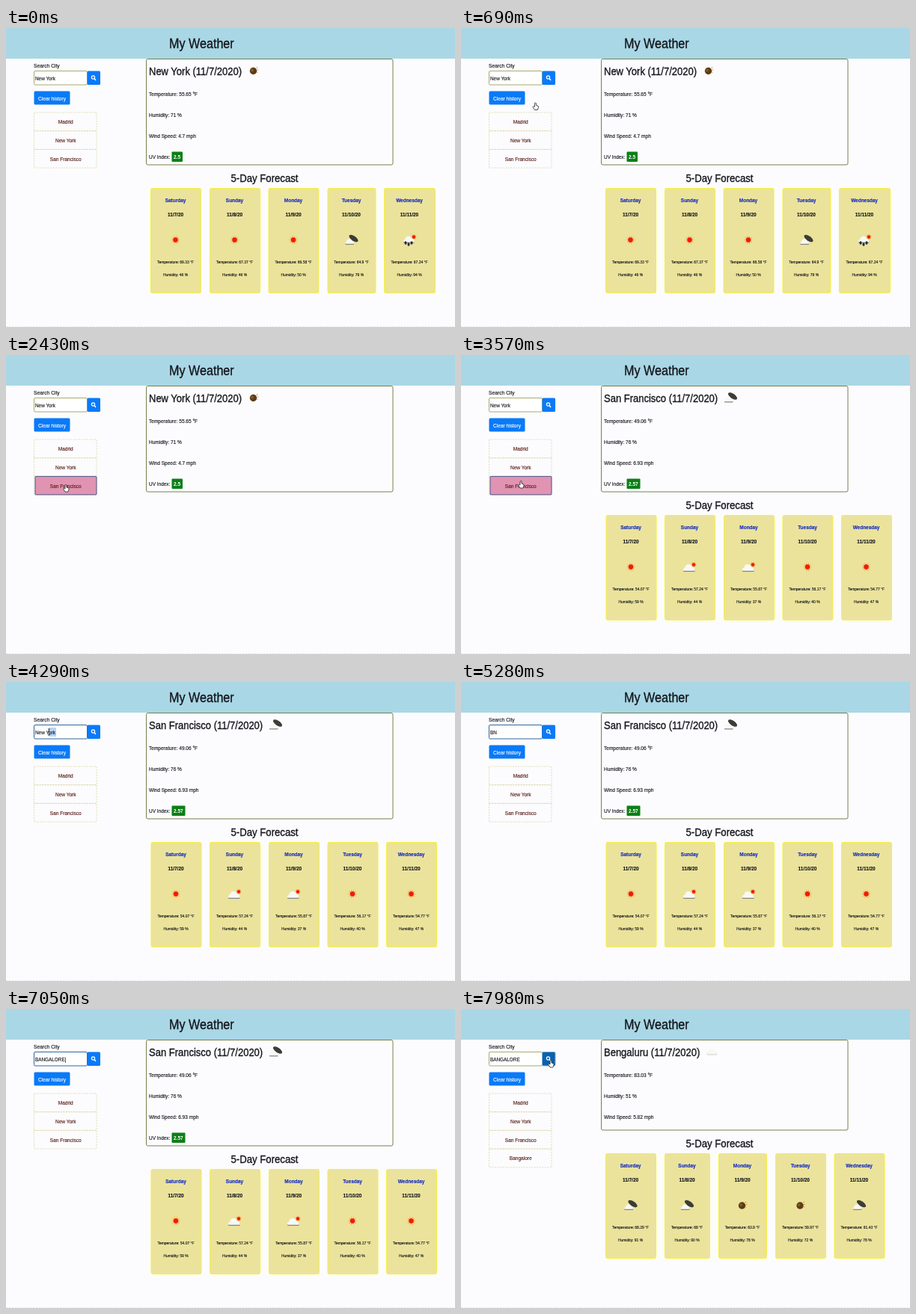
An HTML page for the animation above (8000 ms loop, 600 by 400 pixels).

```html
<!DOCTYPE html>
<html lang="en">
<head>
<meta charset="utf-8">
<title>My Weather</title>
<style>
  html, body { margin: 0; width: 100%; height: 100%; overflow: hidden; background: #fcfcfe; }
  svg { display: block; width: 600px; height: 400px; font-family: "Liberation Sans", Arial, sans-serif; }
</style>
</head>
<body>
<svg id="stage" viewBox="0 0 600 400"></svg>
<script>
const LOOP = 8000;
const SQUEEZE = 0.85; // the whole page is shown narrower than it is tall
const INK = '#14161c';
const BLUE = '#0a7af8';
const stage = document.getElementById('stage');

const cities = {
  newYork: {
    name: 'New York', icon: 'moon', iconX: 331,
    now: ['Temperature: 55.65 °F', 'Humidity: 71 %', 'Wind Speed: 4.7 mph'], uv: '2.5',
    cards: [[193, 68, 'sun', 69.33, 46], [272, 68, 'sun', 67.37, 46], [350.5, 68, 'sun', 66.58, 50],
            [429.5, 65, 'clouds', 64.9, 79], [505, 69, 'rain', 67.24, 94]]
  },
  sanFrancisco: {
    name: 'San Francisco', icon: 'clouds', iconX: 360,
    now: ['Temperature: 49.06 °F', 'Humidity: 76 %', 'Wind Speed: 6.93 mph'], uv: '2.57',
    cards: [[193.5, 68, 'sun', 54.07, 59], [272, 68, 'fair', 57.24, 44], [351, 68, 'fair', 55.87, 37],
            [429.5, 68, 'sun', 56.17, 40], [508, 68, 'sun', 54.77, 47]]
  },
  bengaluru: {
    name: 'Bengaluru', icon: 'cloud', iconX: 335,
    now: ['Temperature: 83.03 °F', 'Humidity: 51 %', 'Wind Speed: 5.82 mph'], uv: '',
    cards: [[193, 68, 'clouds', 68.29, 91], [272, 61, 'clouds', 68, 90], [344, 65, 'moon', 63.9, 78],
            [420, 68, 'moon', 59.97, 72], [498.5, 68, 'clouds', 61.43, 78]]
  }
};
const days = ['Saturday', 'Sunday', 'Monday', 'Tuesday', 'Wednesday'];

const rect = (x, y, w, h, fill, extra = '') =>
  `<rect x="${x}" y="${y}" width="${w}" height="${h}" fill="${fill}" ${extra}/>`;
const text = (x, y, size, content, { fill = INK, weight = 'normal', anchor = 'start', outline = 0.15 } = {}) =>
  `<text transform="translate(${x} ${y}) scale(${SQUEEZE} 1)" font-size="${size}" font-weight="${weight}"
    text-anchor="${anchor}" fill="${fill}" stroke="${fill}" stroke-width="${outline}">${content}</text>`;
const centred = (x, y, size, content, style) => text(x, y, size, content, { anchor: 'middle', ...style });
const heading = (x, y, size, content) => text(x, y, size, content, { outline: 0.35 });
const circle = (x, y, r, fill) => `<circle cx="${x}" cy="${y}" r="${r}" fill="${fill}"/>`;

function sunShape(x, y, r) {
  const points = Array.from({ length: 20 }, (_, i) => {
    const angle = i * Math.PI / 10, reach = i % 2 ? r * 0.5 : r * 1.15;
    return `${x + reach * Math.cos(angle)},${y + reach * Math.sin(angle)}`;
  });
  return `<polygon points="${points.join(' ')}" fill="#f59a3c"/>` + circle(x, y, r * 0.56, '#f01a10');
}
const cloudShape = (x, y, s, fill) =>
  `<path transform="translate(${x} ${y}) scale(${s})" fill="${fill}"
    d="M-8 5Q-10 2-6 0Q-5-5 0-5Q4-5 5-1Q10 0 9 5Z"/>`;
const shadedCloud = (x, y, s) => cloudShape(x, y + 1.2, s, '#85857c') + cloudShape(x, y, s, '#f8f8f6');

const icons = {
  sun: () => sunShape(0, 0, 5.6),
  cloud: () => cloudShape(0, 0.8, 0.75, '#d0d0c4') + cloudShape(0, 0, 0.7, '#f8f8f4'),
  fair: () => sunShape(5.5, -3, 4) + shadedCloud(-1, 0.8, 0.88),
  clouds: () => '<ellipse transform="translate(3 -2) rotate(34)" rx="7" ry="3.2" fill="#3c3c38"/>' +
    shadedCloud(-2.5, 2, 0.65),
  rain: () => sunShape(6, -4, 4) + shadedCloud(-1, -1, 0.8) +
    [-5, -1, 3].map((x, i) => `<ellipse cx="${x}" cy="${4 + i % 2 * 2}" rx="1.5" ry="2.3" fill="#252b3c"/>`).join(''),
  moon: () => circle(-0.5, 0.5, 4.7, '#5c3c18') + circle(-2, -0.5, 2, '#825a20') +
    circle(4.5, -4, 0.8, '#c98d22') + circle(5.5, -1, 0.7, '#c98d22') + circle(5, 2.5, 0.6, '#c98d22')
};
const icon = (name, x, y) => `<g transform="translate(${x} ${y})">${icons[name]()}</g>`;

function cityPanel(city) {
  const bottom = city.uv ? 183 : 162;
  let out = rect(187.5, 41.5, 329.5, bottom - 41.5, 'none', 'rx="2" stroke="#76804f"') +
    heading(191, 62.5, 15.3, `${city.name} (11/7/2020)`) + icon(city.icon, city.iconX, 57) +
    city.now.map((line, i) => text(191, 91.2 + i * 27.7, 7.7, line)).join('');
  if (city.uv) {
    out += text(191, 174.8, 7.6, 'UV Index:') +
      rect(221.5, 165.5, city.uv.length > 3 ? 18 : 14.5, 13.5, '#0c7f16', 'rx="1"') +
      text(224, 174.8, 7.6, city.uv, { fill: '#fff', weight: 'bold', outline: 0 });
  }
  return out;
}

function forecast(city) {
  const shift = city.uv ? 0 : -21;
  const cards = city.cards.map(([x, w, sky, temperature, humidity], i) => {
    const mid = x + w / 2 - 0.5;
    return rect(x + 0.5, 214.5, w - 1, 140, '#ebe39b', 'rx="2" stroke="#f6f03c"') +
      centred(mid, 232.7, 7.6, days[i], { fill: '#1029c4', weight: 'bold' }) +
      centred(mid, 252.3, 7.6, `11/${7 + i}/20`, { weight: 'bold' }) +
      icon(sky, mid, 283.5) +
      centred(mid, 315.3, 5.8, `Temperature: ${temperature} °F`) +
      centred(mid, 332, 5.8, `Humidity: ${humidity} %`);
  });
  return `<g transform="translate(0 ${shift})">${heading(300.5, 206.3, 15.5, '5-Day Forecast')}${cards.join('')}</g>`;
}

// Pointer way points: time, x, y
const route = [[400, 112, 82], [1050, 82, 126], [1650, 82, 126], [2150, 80, 174], [3250, 80, 174],
  [3450, 80, 169], [3580, 80, 169], [3950, 76, 67], [4100, 76, 67], [4550, 28, 67],
  [7200, 100, 90], [7500, 120, 69], [8000, 120, 69]];
const TYPING_START = 4950;

function pointerAt(t) {
  if (t < route[0][0] || (t > TYPING_START && t < 7200)) return null;
  if (t > 4550 && t <= TYPING_START) return { x: 28, y: 67 };
  const next = route.findIndex(stop => stop[0] > t);
  const [t0, x0, y0] = route[next - 1], [t1, x1, y1] = route[next];
  const p = (t - t0) / (t1 - t0), ease = p * p * (3 - 2 * p);
  return { x: x0 + (x1 - x0) * ease, y: y0 + (y1 - y0) * ease };
}

function pointerShape({ x, y }) {
  const inField = x < 108 && y > 57 && y < 76;
  return `<g transform="translate(${x} ${y})" stroke="#222" stroke-width=".8" fill="#fff">` + (inField
    ? '<path fill="none" d="M-1.5-4H1.5M0-4V4M-1.5 4H1.5"/>'
    : '<path d="M-1 0Q0-1 1 0V3L4 4V6L3 9H-1L-3.5 5L-2.5 4L-1 5Z"/>') + '</g>';
}

function typedAt(t) {
  if (t < TYPING_START) return 'New York';
  if (t < 5200) return 'B';
  if (t < 5500) return 'BN';
  if (t < 5700) return 'B';
  return 'BANGALORE'.slice(0, 2 + Math.floor((t - 5700) / 180));
}

function sidebar(t, pointer) {
  const rows = ['Madrid', 'New York', 'San Francisco'];
  if (t >= 7700) rows.push('Bangalore');
  const focused = t >= 3950 && t < 7700;
  const onButton = pointer && pointer.x > 108 && pointer.x < 126 && pointer.y > 57 && pointer.y < 76;
  const caret = focused && t > TYPING_START && Math.floor(t / 600) % 2 ? '<tspan>|</tspan>' : '';

  let out = text(37, 52.5, 7.9, 'Search City') +
    rect(37.5, 57.5, 71, 18.5, '#fff', `rx="1.5" stroke="${focused ? '#31679c' : '#a9aa70'}"`);
  if (t >= 4100 && t < TYPING_START) {
    const width = Math.min(28, Math.max(0, 67 - pointer.x));
    out += rect(67 - width, 61, width, 12, '#b4d5fb');
  }
  out += text(39, 69.5, 7.5, typedAt(t) + caret) +
    rect(108.5, 57.5, 17.5, 18.5, onButton ? '#0961ae' : BLUE,
      `rx="1.5" ${t >= 7700 ? 'stroke="#80add0"' : ''}`) +
    '<circle cx="116.5" cy="66" r="2.1" fill="none" stroke="#fff" stroke-width="1.2"/>' +
    '<path d="M118 67.5L120 70" stroke="#fff" stroke-width="1.3"/>' +
    rect(37.5, 84.5, 48, 18, BLUE, 'rx="1.5"') +
    centred(61.5, 96.5, 7.75, 'Clear history', { fill: '#fff' });

  rows.forEach((row, i) => {
    const y = 113 + i * 24.7;
    const hovered = pointer && pointer.x > 38 && pointer.x < 121 && pointer.y > y && pointer.y < y + 24.7;
    const pressed = i === 2 && t >= 2350 && t < 3950;
    out += rect(37.5, y, 83.5, 24.7, 'none', 'stroke="#d9d5a4" stroke-width=".8" stroke-dasharray="2 1.5"');
    if (hovered) out += rect(39, y, 82, 24.5, '#e193b2');
    if (pressed) out += rect(39, y, 82, 24.5, 'none', 'rx="1" stroke="#4a5488"');
    out += centred(79.7, y + 15.3, 7.7, row, { fill: '#561a14' });
  });
  return out;
}

// A new city first appears without its UV index, which arrives a little later.
function cityAt(t) {
  if (t < 2550) return cities.newYork;
  if (t < 2850) return { ...cities.sanFrancisco, uv: '' };
  return t < 7820 ? cities.sanFrancisco : cities.bengaluru;
}

function draw(t) {
  const pointer = pointerAt(t);
  const city = cityAt(t);
  const loading = (t >= 2380 && t < 2650) || (t >= 7700 && t < 7880);
  stage.innerHTML = rect(0, 0, 600, 400, '#fcfcfe') +
    rect(0, 0, 600, 41, '#a9d7e5') +
    heading(218, 26.5, 19, 'My Weather') +
    '<path d="M0 399.5H600" stroke="#e6e6e8" stroke-dasharray="2 2"/>' +
    sidebar(t, pointer) + cityPanel(city) + (loading ? '' : forecast(city)) +
    (pointer ? pointerShape(pointer) : '');
}

const start = performance.now();
function tick() {
  draw((performance.now() - start) % LOOP);
  requestAnimationFrame(tick);
}
tick();
</script>
</body>
</html>
```
